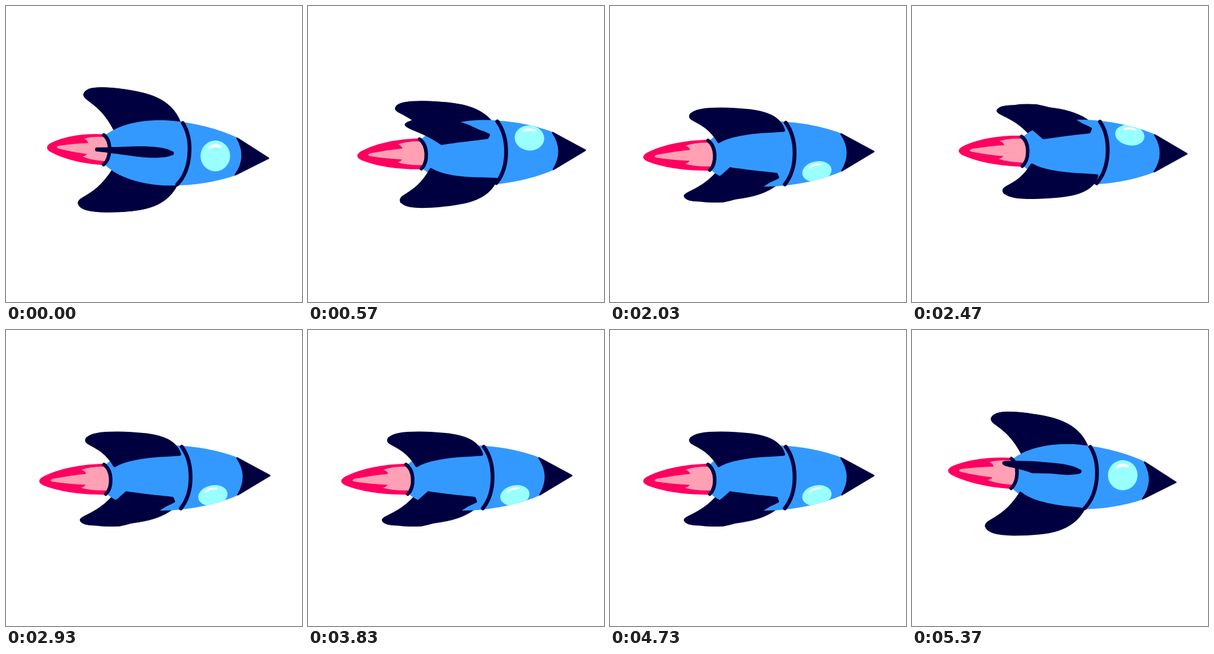
An HTML page with a canvas for the animation above (5.41 s loop, 500 by 500 pixels).

```html
<!DOCTYPE html>
<html lang="en">
<head>
<meta charset="utf-8">
<title>Rocket</title>
<style>
  html, body { margin: 0; width: 100%; height: 100%; overflow: hidden; background: #fff; }
  canvas { display: block; width: 500px; height: 500px; }
</style>
</head>
<body>
<canvas id="stage" width="500" height="500"></canvas>
<script>
const ctx = document.getElementById('stage').getContext('2d');
const NAVY = '#000040', BLUE = '#3399ff', RED = '#ff0060', PINK = '#ffa0b4', GLASS = '#99ffff';
const LOOP = 5410, STEPS = 162, CYCLE = 27;
const TURN = 2 * Math.PI / CYCLE;
const rad = deg => deg * Math.PI / 180;

// Shapes lie along the rocket's axis: x forward, y away from the axis.
const BODY = new Path2D(`M-127 -26 C-102 -47 -62 -55 -25 -55 C20 -54 62 -45 94 -32
  L148 0 L94 32 C62 45 20 54 -25 55 C-62 55 -102 47 -127 25 Q-114 0 -127 -26Z`);
const NOSE = new Path2D('M94 -31 Q114 0 94 31 L148.5 0Z');
const BAND = new Path2D('M1 -52 C20 -25 20 25 -3 52');
const TAIL_BAND = new Path2D('M-131 -25 C-117 -15 -117 14 -129 25');
const FLAME = new Path2D(`M-122 -26 C-160 -28 -197 -20 -220 -7 Q-232 1 -220 8
  C-197 19 -165 26 -122 26Z`);
const FLAME_CORE = new Path2D(`M-122 -21 Q-148 -23 -164 -17 Q-158 -15 -157 -10
  Q-182 -8 -206 -3 Q-213 0 -206 2 Q-181 7 -158 8.5 Q-160 12 -165 13 Q-152 19 -122 19Z`);
const GLINT = new Path2D('M-10 -13 Q-3 -20 7 -16');

// Fin outlines: a start point followed by cubic curves, each point [x, radius].
const FIN_TIP = [[-120, 105], [-150, 106], [-166, 103], [-169, 92]];
const LONG_FIN = [
  [-3, 53.5], [-22, 95], [-65, 102], ...FIN_TIP,
  [-169, 80], [-140, 80], [-113, 31],
  [-93, 46], [-60, 51], [-25, 52]
];
const SHORT_FIN = [
  [-15, 54], [-40, 62], [-55, 90], ...FIN_TIP,
  [-160, 80], [-130, 72], [-94, 32],
  [-70, 38], [-40, 43], [-17, 47]
];
const FIN_EDGE = [[0, 3.5], [0.4, 7], [0.55, 10], [0.72, 9.3], [0.9, 8.7], [1, 5], [1, 0]];

function curve(points) {
  ctx.beginPath();
  ctx.moveTo(...points[0]);
  for (let i = 1; i < points.length; i += 3) {
    ctx.bezierCurveTo(...points[i], ...points[i + 1], ...points[i + 2]);
  }
  ctx.closePath();
}

function fill(path, color) {
  ctx.fillStyle = color;
  ctx.fill(path);
}

function stroke(path, color, width) {
  ctx.strokeStyle = color;
  ctx.lineWidth = width;
  ctx.stroke(path);
}

function drawFin(shape, angle, gain) {
  const lift = Math.sin(angle) * gain;
  const depth = Math.cos(angle);
  const facing = Math.max(0, depth);
  // Near parts slide forward, far parts slide back.
  const shift = (depth > 0 ? 30 : 14) * depth ** 3;
  curve(shape.map(([x, r]) => [x + shift * Math.max(0, r - 54) / 41, r * lift]));
  ctx.fillStyle = ctx.strokeStyle = NAVY;
  ctx.lineWidth = 1 + 6 * facing;
  ctx.fill();
  ctx.stroke();

  if (facing < 0.5) return;
  const left = -168 + shift, right = -13;
  const side = sign => FIN_EDGE.map(([u, half]) => [
    left + (right - left) * u,
    (95 - 41 * u) * lift + sign * half * facing
  ]);
  const upper = side(-1), lower = side(1).reverse();
  const cap = [[left - 4, lower[6][1]], [left - 4, upper[0][1]], upper[0]];
  curve([...upper, ...lower.slice(1), ...cap]);
  ctx.fill();
}

function drawFlame(step) {
  const stretch = [1, 1.153, 1.11][step % 3];
  ctx.save();
  ctx.translate(-128, 0);
  ctx.scale(stretch, 1);
  ctx.translate(128, 0);
  fill(FLAME, RED);
  fill(FLAME_CORE, PINK);
  ctx.restore();
}

function drawWindow(roll) {
  const s = Math.sin(roll);
  ctx.save();
  ctx.clip(BODY);
  ctx.translate(58.7 - 14 * s * s, 0.7 + 43.5 * s);
  ctx.rotate(rad(-14 * s));
  ctx.scale(1, Math.cos(roll) ** 1.2);
  ctx.beginPath();
  ctx.ellipse(0, 0, 25, 26, 0, 0, 2 * Math.PI);
  ctx.fillStyle = GLASS;
  ctx.fill();
  stroke(GLINT, '#fff', 5);
  ctx.restore();
}

function draw(step) {
  const roll = rad(45) * Math.sin(TURN * step);
  const tilt = rad(-0.05 + 3.14 * Math.cos(TURN * (step + 1.5)));
  const surge = 10.75 - 14.25 * Math.cos(TURN * (step - 3.07));
  const gain = 1 - 0.016 * (1 - Math.cos(TURN * step)) + 0.12 * Math.sin(roll) ** 2;

  ctx.fillStyle = '#fff';
  ctx.fillRect(0, 0, 500, 500);
  ctx.save();
  ctx.translate(295 + surge, 249.5 - 0.1 * surge);
  ctx.rotate(tilt);
  ctx.lineCap = ctx.lineJoin = 'round';

  const fins = [
    [LONG_FIN, roll - Math.PI / 2],
    [LONG_FIN, roll + Math.PI / 2],
    [SHORT_FIN, roll]
  ];
  const inFront = ([, angle]) => Math.cos(angle) > 0.001;
  const drawFins = list => list.forEach(([shape, angle]) => drawFin(shape, angle, gain));

  drawFins(fins.filter(fin => !inFront(fin)));
  drawFlame(step);
  fill(BODY, BLUE);
  fill(NOSE, NAVY);
  stroke(NOSE, NAVY, 2.5);
  drawWindow(roll);
  stroke(BAND, NAVY, 6.5);
  stroke(TAIL_BAND, NAVY, 6);
  drawFins(fins.filter(inFront));
  ctx.restore();
}

const start = performance.now();
function tick() {
  const time = (performance.now() - start) % LOOP;
  const step = Math.min(STEPS - 1, Math.floor((time + 5) * 0.03));
  draw(step % CYCLE);
  requestAnimationFrame(tick);
}
tick();
</script>
</body>
</html>
```
